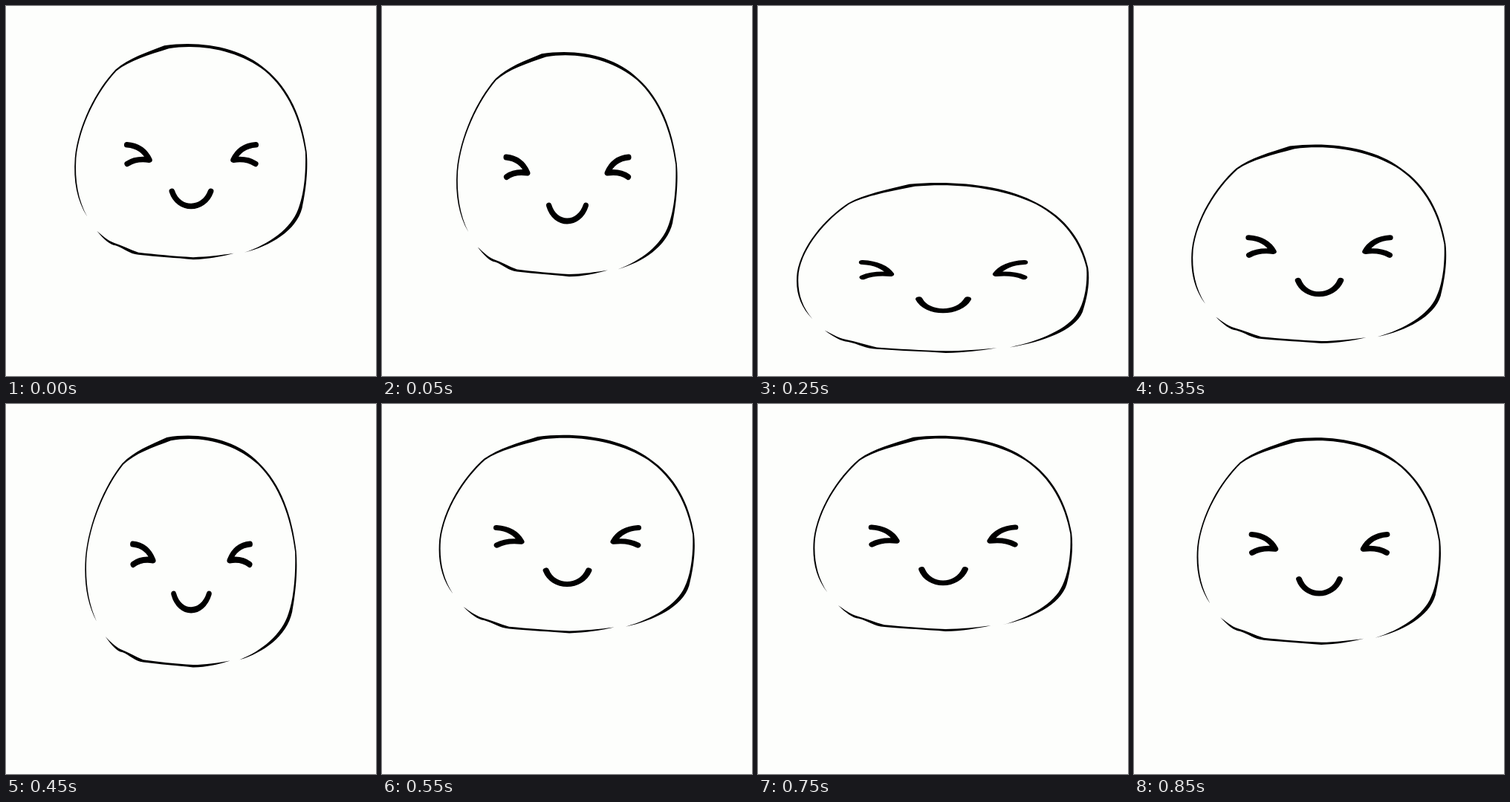
These frames come from a looping animation (498x498 px, 0.9 s). An HTML page:

```html
<!DOCTYPE html>
<html lang="en">
<head>
<meta charset="utf-8">
<title>Bouncing smiley</title>
<style>
  html, body { margin: 0; width: 100%; height: 100%; overflow: hidden; background: #fdfefc; }
  svg { display: block; width: 498px; height: 498px; }
  .face { fill: none; stroke: #000; stroke-width: 7.6; stroke-linecap: round; stroke-linejoin: round; }
</style>
</head>
<body>
<svg viewBox="0 0 498 498">
  <g id="ball">
    <!-- Brush strokes: outer edge, then back along the inner edge -->
    <path d="M109 284C95 262 90 236 92.3 205C97 160 121 114 147 86.5C165 71 188 63.5 213 54
      C262 47 316 56 350 86C382 112 399 152 405 196C408 226 402 258 399 272C391 303 356 323 321 332
      C354 321 384 300 393.5 274C401 256 404.5 226 403.3 197C397 154 380 114 348.5 88
      C314 61.5 264 51 219 58C192 66.5 166 74 148.5 88C123 115 98.5 161 94 205C92 236 97 262 109 284Z"/>
    <path d="M122 303C131 314 140 322 147 322.5C158 326 166 334 178 335C205 338 228 339 252 341.5
      C272 341 290 337.5 307 333C290 335.5 270 338 252 338.3C226 337 200 334.5 178 332
      C166 328 156 322.5 145 319C136 315.5 129 309 122 303Z"/>
    <g class="face">
      <path id="eye" d="M162.5 187.3Q184 189 192.8 207.6Q175 205 163 212.8"/>
      <use href="#eye" transform="matrix(-1 0 0 1 499 0)"/>
      <path d="M223.3 249.7C232 276.5 266 276.5 275.7 249.7"/>
    </g>
  </g>
</svg>
<script>
const LOOP = 900, STEP = 50, START = 180;
const CX = 249.5, BASE = 341, WIDTH = 313, HEIGHT = 290;
const FLOOR = 466.5, JUMP = 162;
const LAND = 380, LIFT = 520, APEX = 766;

// Body width over the bounce: rest, stretch, squash, stretch, rest
const widths = [[0, 349], [LAND, 269], [430, 392], [490, 394], [580, 269], [760, 349], [LOOP, 349]];

const ease = u => u * u * (3 - 2 * u);

function widthAt(t) {
  const i = widths.findIndex(([time]) => time > t);
  const [t0, a] = widths[i - 1], [t1, b] = widths[i];
  return a + (b - a) * ease((t - t0) / (t1 - t0));
}

// Free fall, contact with the floor, ballistic rise, pause at the top
function bottomAt(t) {
  const drop = t < LAND ? t / LAND
    : t < LIFT ? 1
    : Math.max(0, (APEX - t) / (APEX - LIFT));
  return FLOOR - JUMP * (1 - drop * drop);
}

const ball = document.getElementById("ball");

function draw() {
  const now = Math.floor(performance.now() % LOOP / STEP) * STEP;
  const t = (now + START) % LOOP;
  const w = widthAt(t), h = 531 - 0.77 * w;
  ball.setAttribute("transform",
    `translate(${CX} ${bottomAt(t)}) scale(${w / WIDTH} ${h / HEIGHT}) translate(${-CX} ${-BASE})`);
  requestAnimationFrame(draw);
}
draw();
</script>
</body>
</html>
```
